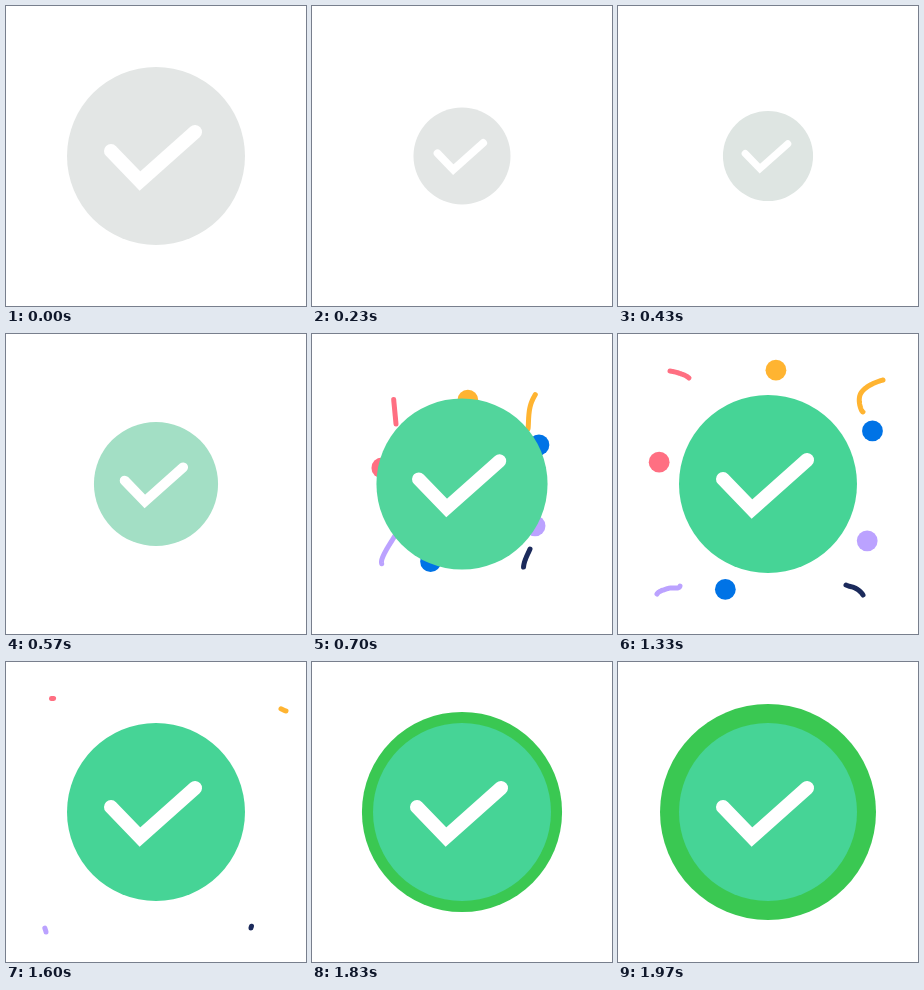
Recreate the animation shown at these times as an HTML page with a canvas. Size 300 px wide and 300 px high, loop 2010 ms.

```html
<!DOCTYPE html>
<html lang="en">
<head>
<meta charset="utf-8">
<title>Success check</title>
<style>
  html, body { margin: 0; width: 100%; height: 100%; overflow: hidden; background: #fff; }
  canvas { display: block; width: 300px; height: 300px; }
</style>
</head>
<body>
<canvas id="stage" width="300" height="300"></canvas>
<script>
const ctx = document.getElementById('stage').getContext('2d');
const LOOP = 2010, STEP = 100 / 3, LAST = 59;
const MID = 150, RADIUS = 89, DOT = 10.4, BEND = 0.62;
const GREY = [227, 230, 229], GREEN = [70, 212, 150];
const YELLOW = '#ffb431', RED = '#ff6f82', BLUE = '#0073e6', LILAC = '#bba2ff', NAVY = '#1b2a5b';

const dots = [
  [158, 35.3, YELLOW], [40.3, 128, RED], [255.3, 96.5, BLUE],
  [250, 207.3, LILAC], [107, 256.3, BLUE]
];

// Key points of the curves the ribbons slide along, from the badge outwards
const ribbons = [
  [RED, [84, 90], [82, 69], [81, 60], [78, 53], [71, 44], [62, 39.5], [52, 37], [45.5, 36.5]],
  [YELLOW, [216, 95], [220, 67], [236, 50], [252, 61], [245, 78], [243, 59], [265, 46], [280, 49]],
  [LILAC, [84, 200], [70, 225], [72, 237], [55, 236], [62, 252], [50, 254.5], [39, 260], [40, 270]],
  [NAVY, [218, 215], [212, 230], [213, 239], [218, 245], [228, 251], [238, 254.5], [245, 261], [245, 266]]
];

const mix = (a, b, p) => a + (b - a) * p;
const part = (f, from, to) => Math.min(1, Math.max(0, (f - from) / (to - from)));
const inOut = p => p < 0.5 ? 4 * p ** 3 : 1 - 4 * (1 - p) ** 3;
const out = p => 1 - (1 - p) ** 3;
const smooth = p => p * p * (3 - 2 * p);

// Cardinal spline through pts; u counts points
function along(pts, u) {
  const n = pts.length - 1, i = Math.min(Math.floor(u), n - 1), t = u - i;
  const [a, b, c, d] = [i - 1, i, i + 1, i + 2].map(k => pts[Math.min(n, Math.max(0, k))]);
  return [0, 1].map(k => mix(b[k], c[k], smooth(t))
    + BEND * t * (1 - t) * ((1 - t) * (c[k] - a[k]) - t * (d[k] - b[k])));
}

function disc(x, y, r, color) {
  ctx.fillStyle = color;
  ctx.beginPath();
  ctx.arc(x, y, r, 0, 2 * Math.PI);
  ctx.fill();
}

function line(pts, width, color, join) {
  ctx.lineWidth = width;
  ctx.strokeStyle = color;
  ctx.lineCap = 'round';
  ctx.lineJoin = join;
  ctx.beginPath();
  pts.forEach(p => ctx.lineTo(...p));
  ctx.stroke();
}

function drawDots(f) {
  if (f < 18 || f >= 48) return;
  const spread = mix(0.3, 1, out(part(f, 18, 29))) - 0.5 * inOut(part(f, 38.5, 48));
  for (const [x, y, color] of dots)
    disc(mix(MID, x, spread), mix(MID, y, spread), DOT, color);
}

// The head runs evenly to the last point, the tail speeds up behind it.
function drawRibbons(f) {
  if (f < 21 || f >= 49) return;
  const k = (f - 28) / 12;
  const head = Math.min(7, 3 + 3 * k);
  const tail = Math.max(0, 1 + 2.5 * k + 0.5 * k * k);
  for (const [color, ...pts] of ribbons) {
    const curve = Array.from({ length: 41 }, (_, i) => along(pts, mix(tail, head, i / 40)));
    line(curve, 5, color, 'round');
  }
}

function drawRing(f) {
  if (f > 50) disc(MID, MID, mix(RADIUS, 108, smooth(part(f, 50, LAST))), '#3ac852');
}

function drawBadge(f) {
  const grow = inOut(part(f, 10, 25));
  const scale = 1 - 0.51 * (inOut(part(f, 0, 10)) - grow);
  const tone = GREY.map((v, i) => Math.round(mix(v, GREEN[i], grow)));
  ctx.save();
  ctx.translate(MID, MID);
  ctx.scale(scale, scale);
  disc(0, 0, RADIUS, `rgb(${tone})`);
  line([[-45, -5], [-16, 25], [39, -24]], 14, '#fff', 'miter');
  ctx.restore();
}

function draw(f) {
  ctx.fillStyle = '#fff';
  ctx.fillRect(0, 0, 300, 300);
  drawRibbons(f);
  drawDots(f);
  drawRing(f);
  drawBadge(f);
}

const start = performance.now();
function tick() {
  // Frame times are rounded to 10 ms
  const t = Math.floor((performance.now() - start) % LOOP / 10) * 10;
  draw(Math.min(LAST, Math.floor((t + 3.4) / STEP)));
  requestAnimationFrame(tick);
}
tick();
</script>
</body>
</html>
```
